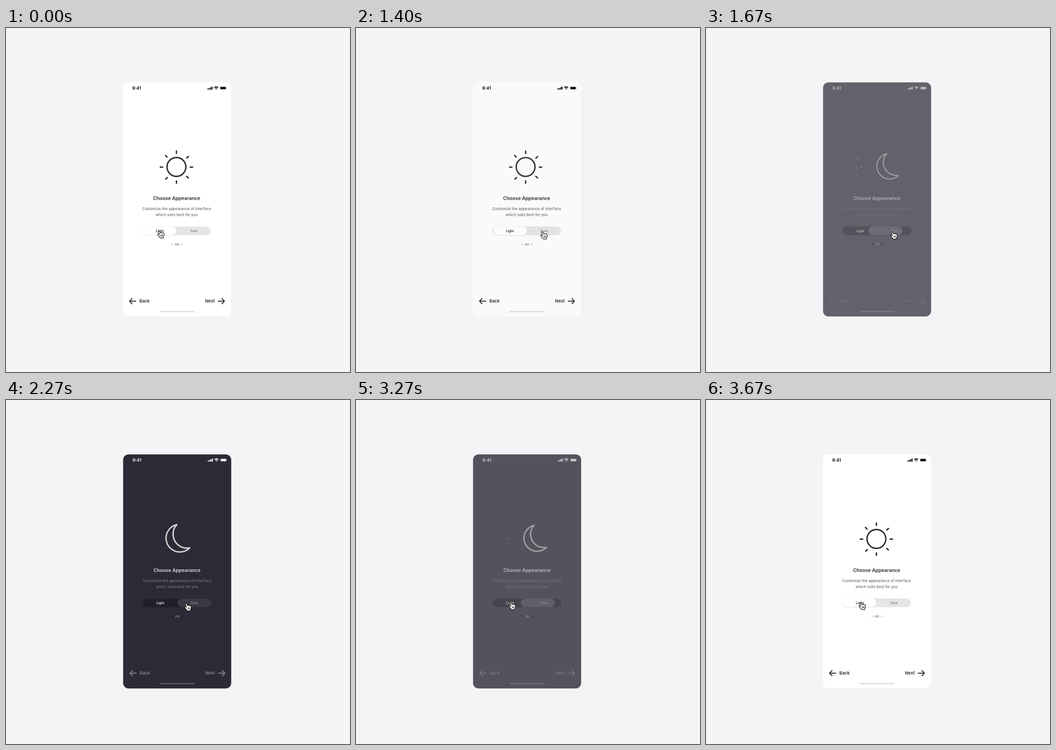
Animation of 748 by 748 pixels, one loop 3940 ms. Source, as an HTML page with a canvas:

```html
<!DOCTYPE html>
<html lang="en">
<head>
<meta charset="utf-8">
<title>Choose Appearance</title>
<style>
  html, body { margin: 0; width: 100%; height: 100%; overflow: hidden; background: #f3f4f6; }
  canvas { display: block; }
</style>
</head>
<body>
<canvas id="stage" width="748" height="748"></canvas>
<script>
const ctx = document.getElementById('stage').getContext('2d');
const LOOP = 3940, FPS = 15;

// Each entry holds the light and the dark colour.
const palette = {
  screen: ['#ffffff', '#2d2a37'],
  status: ['#000000', '#ffffff'],
  icon: ['#303030', '#d6d4d3'],
  title: ['#2a2a2a', '#dddbdd'],
  body: ['#6c6c6c', '#74727b'],
  track: ['#e6e6e6', '#211f2b'],
  thumb: ['#ffffff', '#3b3945'],
  light: ['#262626', '#e8e6e6'],
  dark: ['#848484', '#8a8891'],
  dot: ['#e4e4e4', '#211f2b'],
  pill: ['#c6c6c6', '#54525d'],
  nav: ['#2d2d2d', '#86848c'],
  home: ['#dfdfdf', '#54525d']
};

const clamp = v => Math.min(1, Math.max(0, v));
const lerp = (a, b, t) => a + (b - a) * t;
const span = (n, start, length) => clamp((n - start) / length);
const easeInOut = u => u * u * (3 - 2 * u);
const easeOut = u => 1 - Math.pow(1 - u, 1.7);
const channels = hex => [1, 3, 5].map(i => parseInt(hex.slice(i, i + 2), 16));

function tone(name, p) {
  const [a, b] = palette[name].map(channels);
  return `rgb(${a.map((v, i) => Math.round(lerp(v, b[i], p))).join(',')})`;
}

function box(x, y, w, h, r, color) {
  ctx.fillStyle = color;
  ctx.beginPath();
  ctx.roundRect(x, y, w, h, r);
  ctx.fill();
}

function line(points, width, color, cap = 'butt') {
  ctx.strokeStyle = color;
  ctx.lineWidth = width;
  ctx.lineCap = cap;
  ctx.lineJoin = 'miter';
  ctx.beginPath();
  points.forEach(([x, y]) => ctx.lineTo(x, y));
  ctx.stroke();
}

function text(str, x, y, size, weight, color, align = 'center') {
  ctx.font = `${weight} ${size}px Inter, sans-serif`;
  ctx.textAlign = align;
  ctx.fillStyle = color;
  ctx.fillText(str, x, y);
}

function statusBar(p) {
  const color = tone('status', p);
  text('9:41', 274.4, 134, 9.5, 600, color, 'left');
  [2.5, 3.8, 5.3, 6.8].forEach((h, i) => box(438 + 3 * i, 134 - h, 2.1, h, 0.6, color));

  ctx.strokeStyle = color;
  ctx.lineCap = 'butt';
  ctx.lineWidth = 1.4;
  for (const r of [6.2, 3.9]) {
    ctx.beginPath();
    ctx.arc(457, 133.7, r, -Math.PI * 0.75, -Math.PI * 0.25);
    ctx.stroke();
  }
  ctx.fillStyle = color;
  ctx.beginPath();
  ctx.moveTo(457, 133.9);
  ctx.arc(457, 133.9, 2.3, -Math.PI * 0.75, -Math.PI * 0.25);
  ctx.fill();

  ctx.globalAlpha = 0.35;
  ctx.lineWidth = 0.7;
  ctx.beginPath();
  ctx.roundRect(465.2, 127.3, 13.6, 6.8, 1.9);
  ctx.stroke();
  box(479.4, 129.5, 0.9, 2.4, 0.5, color);
  ctx.globalAlpha = 1;
  box(466.2, 128.3, 11.6, 4.8, 1, color);
}

function placeIcon(x, y, scale, alpha, draw) {
  ctx.save();
  ctx.globalAlpha = alpha;
  ctx.translate(x, y);
  ctx.scale(scale, scale);
  draw();
  ctx.restore();
}

function sun(color) {
  ctx.strokeStyle = color;
  ctx.lineWidth = 3.1;
  ctx.beginPath();
  ctx.arc(0, -0.5, 20.5, 0, Math.PI * 2);
  ctx.stroke();
  for (const degrees of [0, 42, 90, 131.5, 180, 227, 270, 318.5]) {
    const a = degrees * Math.PI / 180, c = Math.cos(a), s = Math.sin(a);
    line([[30 * c, 30 * s], [35 * c, 35 * s]], 3, color, 'round');
  }
}

function moon(color) {
  const tips = [[-2, -29.6], [26, 20.9]];
  const angle = ([x, y], cx, cy) => Math.atan2(y - cy, x - cx);
  ctx.strokeStyle = color;
  ctx.lineWidth = 3;
  ctx.lineJoin = 'round';
  ctx.beginPath();
  ctx.arc(4.6, -0.2, 30.1, angle(tips[0], 4.6, -0.2), angle(tips[1], 4.6, -0.2), true);
  ctx.arc(20.1, -8.9, 30.3, angle(tips[1], 20.1, -8.9), angle(tips[0], 20.1, -8.9));
  ctx.closePath();
  ctx.stroke();
}

function icons(p) {
  const color = tone('icon', p), travel = 84;
  ctx.save();
  ctx.beginPath();
  ctx.rect(324.8, 240, 93, 120);
  ctx.clip();
  placeIcon(370.6 - travel * p, 302.6, 1 - 0.2 * p, 1 - p, () => sun(color));
  placeIcon(372.7 + travel * (1 - p), 300.6, 0.72 + 0.28 * p, p, () => moon(color));
  ctx.restore();
}

function toggle(p) {
  box(296.7, 431.6, 148.8 + 0.5 * p, 19, 9.5, tone('track', p));
  ctx.save();
  ctx.shadowColor = `rgba(0,0,0,${lerp(0.16, 0.05, p)})`;
  ctx.shadowBlur = 2;
  ctx.shadowOffsetY = 0.7;
  box(296.7 + 75.3 * p, 431.6, 74.2, 18.8, 9.4, tone('thumb', p));
  ctx.restore();
  text('Light', 334.7, 443.6, 7.1, 600, tone('light', p));
  text('Dark', 409, 443.6, 7.1, 600, tone('dark', p));
}

function footer(p) {
  const color = tone('nav', p);
  for (const [tip, dir] of [[268.6, 1], [475, -1]]) {
    line([[tip, 594], [tip + 14.4 * dir, 594]], 2, color);
    line([[tip + 6 * dir, 587.8], [tip, 594], [tip + 6 * dir, 600.2]], 2, color);
  }
  text('Back', 290, 597.4, 9.4, 600, color, 'left');
  text('Next', 454, 597.4, 9.4, 600, color, 'right');
  box(334, 615.2, 75.5, 3, 1.5, tone('home', p));
}

function phone(p) {
  ctx.save();
  ctx.translate(0.8 * p, 0);
  box(253.9, 118.2, 235, 509, 12, tone('screen', p));
  statusBar(p);
  icons(p);
  text('Choose Appearance', 371, 373.5, 10.4, 600, tone('title', p));
  text('Customize the appearance of interface', 371, 396.1, 8.05, 500, tone('body', p));
  text('which suits best for you', 371, 408.7, 8.05, 500, tone('body', p));
  toggle(p);
  for (const x of [361.7, 381.7]) box(x - 2.5, 468, 5, 5, 2.5, tone('dot', p));
  box(366.4, 468, 10.6, 5, 2.5, tone('pill', p));
  footer(p);
  ctx.restore();
}

const hand = new Path2D(
  'M2.6 2.4C2.2 1 4.6 .2 5.4 1.9L7 5.8C7.4 4.6 9.4 4.8 9.7 6C10.3 5 12.2 5.3 12.5 6.6' +
  'C13.4 5.9 15 6.6 15.1 8.2C15.2 11 14.6 12.6 13.6 14.2L13.4 16.8H6.4C5.8 15 3.6 13.4 2.2 11.6' +
  'C1 10 .4 8.8 1.4 8.2C2.6 7.6 3.6 8.6 4.8 9.6Z');

function cursor(x, y) {
  ctx.save();
  ctx.translate(x, y);
  ctx.fillStyle = '#fff';
  ctx.strokeStyle = '#111';
  ctx.lineWidth = 1.2;
  ctx.lineJoin = 'round';
  ctx.fill(hand);
  ctx.stroke(hand);
  for (const lx of [7.8, 9.8, 11.8]) line([[lx, 9.6], [lx, 13.6]], 0.9, '#111', 'round');
  ctx.restore();
}

function render(now) {
  // Motion advances in fixed ticks; the small offset absorbs rounded times.
  const tick = Math.floor((now % LOOP + 3.4) * FPS / 1000);

  const p = easeInOut(span(tick, 20.4, 6.9)) - easeOut(span(tick, 48.3, 6));
  const go = easeInOut(span(tick, 7.3, 7.7));
  const back = easeOut(span(tick, 33.1, 7.7));

  ctx.fillStyle = '#f3f4f6';
  ctx.fillRect(0, 0, 748, 748);
  phone(clamp(p));
  cursor(328.8 + 71.9 * go - 68.9 * back, 439.8 + 2.2 * go - 3 * back);
}

const start = performance.now();
function loop() {
  render(performance.now() - start);
  requestAnimationFrame(loop);
}
loop();
</script>
</body>
</html>
```
